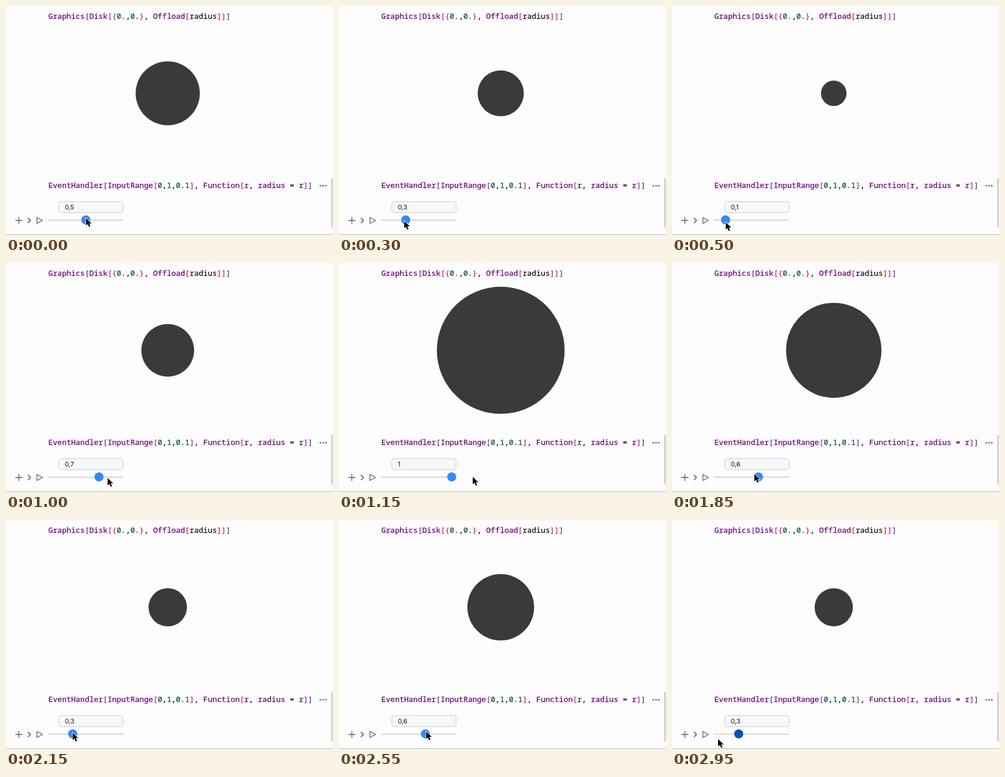
These frames come from a looping animation (560 by 394 pixels, 3000 ms). An HTML page:

```html
<!DOCTYPE html>
<html lang="en">
<head>
<meta charset="utf-8">
<title>Slider and disk</title>
<style>
  html, body { margin: 0; width: 100%; height: 100%; overflow: hidden; background: #fdfdfd; }
  svg { display: block; width: 560px; height: 394px; }
  .code { font: 500 13px "Noto Sans Mono", "DejaVu Sans Mono", monospace; white-space: pre; }
  .code, .code tspan { fill: var(--c, #111); stroke: var(--c, #111); stroke-width: .25px; }
  .fn { --c: #660077; }
  .num { --c: #0c5238; }
  .b1 { --c: #3440a8; }
  .b2 { --c: #b0259a; }
  .b3 { --c: #d01c38; }
  .icon { fill: none; stroke: #5c5c5c; stroke-width: 1.3; stroke-linejoin: round; }
  #value { font: 11px Inter, "Liberation Sans", sans-serif; fill: #111; }
</style>
</head>
<body>
<svg viewBox="0 0 560 394">
  <rect width="560" height="394" fill="#fdfdfd"/>
  <text class="code" x="72.5" y="22"><tspan class="fn">Graphics</tspan><tspan class="b1">[</tspan><tspan class="fn">Disk</tspan><tspan class="b2">[</tspan><tspan class="b3">{</tspan><tspan class="num">0.</tspan>,<tspan class="num">0.</tspan><tspan class="b3">}</tspan>, <tspan class="fn">Offload</tspan><tspan class="b3">[</tspan>radius<tspan class="b3">]</tspan><tspan class="b2">]</tspan><tspan class="b1">]</tspan></text>
  <circle id="disk" cx="277" cy="150.2" fill="#3a3a3a"/>
  <text class="code" x="72.5" y="313"><tspan class="fn">EventHandler</tspan><tspan class="b1">[</tspan><tspan class="fn">InputRange</tspan><tspan class="b2">[</tspan><tspan class="num">0</tspan>,<tspan class="num">1</tspan>,<tspan class="num">0.1</tspan><tspan class="b2">]</tspan>, <tspan class="fn">Function</tspan><tspan class="b2">[</tspan><tspan class="fn">r</tspan>, <tspan class="fn">radius</tspan> = <tspan class="fn">r</tspan><tspan class="b2">]</tspan><tspan class="b1">]</tspan></text>
  <g fill="#555">
    <circle cx="538.3" cy="309.3" r="1.3"/><circle cx="543" cy="309.3" r="1.3"/><circle cx="547.7" cy="309.3" r="1.3"/>
  </g>
  <path d="M558.3 296V381" stroke="#b0b0b0" stroke-width="1.5"/>
  <path d="M0 393.5H560" stroke="#b4b4b4"/>
  <path class="icon" d="M16 369H28M22 363V375"/>
  <path class="icon" style="stroke-width:1.7" d="M37.6 364.6L42 369L37.6 373.4"/>
  <path class="icon" d="M53 363.8V374.2L62.6 369Z"/>
  <rect x="90.5" y="336.5" width="110" height="19" rx="4" fill="#f7f8fc" stroke="#c9cad2"/>
  <text id="value" x="100.7" y="350"></text>
  <rect x="72" y="367" width="129" height="3" rx="1.5" fill="#e0e0e0"/>
  <circle id="thumb" cy="368" r="7.8"/>
  <path id="cursor" d="M0 .9V13.8L3 11.1L5.1 16L7.4 15L5.3 10.3H9.5Z" fill="#000" stroke="#fff" stroke-width="1.8" stroke-linejoin="round" paint-order="stroke"/>
</svg>
<script>
  const LOOP = 3000, STEP = 50, RELEASE = 2800;
  const THUMB_LAG = 40, DISK_LAG = 110;
  const LEFT = 80.5, SPAN = 112.5, FULL_RADIUS = 109.4;
  const $ = id => document.getElementById(id);
  const disk = $("disk"), label = $("value"), thumb = $("thumb"), cursor = $("cursor");

  // turning points of the pointer: time, x, y
  const path = [
    [0, 137, 364], [390, 103, 370], [480, 92, 371], [750, 92, 371],
    [1000, 174, 369], [1040, 193, 368.5], [1150, 229, 367], [1300, 242, 365],
    [1740, 164.5, 362.5], [1850, 141, 362], [2050, 114.2, 365], [2300, 114.2, 365],
    [2520, 150, 363], [RELEASE, 114.2, 365], [2950, 79, 376]
  ];

  const slope = (i, k) => (path[i + 1][k] - path[i][k]) / (path[i + 1][0] - path[i][0]);

  // harmonic mean of the neighbouring slopes, flat at turns and holds
  function tangent(i, k) {
    if (i === 0) return slope(0, k);
    if (i === path.length - 1) return slope(i - 1, k);
    const a = slope(i - 1, k), b = slope(i, k);
    return a * b > 0 ? 2 * a * b / (a + b) : 0;
  }

  // smooth curve through the turning points without overshoot
  function along(t, k) {
    let i = 0;
    while (i < path.length - 2 && path[i + 1][0] < t) i++;
    const h = path[i + 1][0] - path[i][0];
    const p = Math.min(1, (t - path[i][0]) / h), q = 1 - p;
    return path[i][k] * q * q * (1 + 2 * p) + path[i + 1][k] * p * p * (1 + 2 * q)
      + h * p * q * (tangent(i, k) * q - tangent(i + 1, k) * p);
  }

  // slider position under the pointer, held after the button is released
  function dragged(t) {
    const x = along(Math.min(Math.max(t, 0), RELEASE), 1);
    return Math.min(1, Math.max(0, (x - LEFT) / SPAN));
  }

  function draw(time) {
    const t = Math.floor((time % LOOP) / STEP) * STEP;
    const v = Math.round(dragged(t - THUMB_LAG) * 10) / 10;
    disk.setAttribute("r", FULL_RADIUS * dragged(t - DISK_LAG));
    label.textContent = String(v).replace(".", ",");
    thumb.setAttribute("cx", LEFT + SPAN * v);
    thumb.setAttribute("fill", t > RELEASE ? "#0550b8" : "#3388fa");
    cursor.setAttribute("transform", `translate(${along(t, 1)} ${along(t, 2)})`);
  }

  const start = performance.now();
  function tick() {
    draw(performance.now() - start);
    requestAnimationFrame(tick);
  }
  tick();
</script>
</body>
</html>
```
